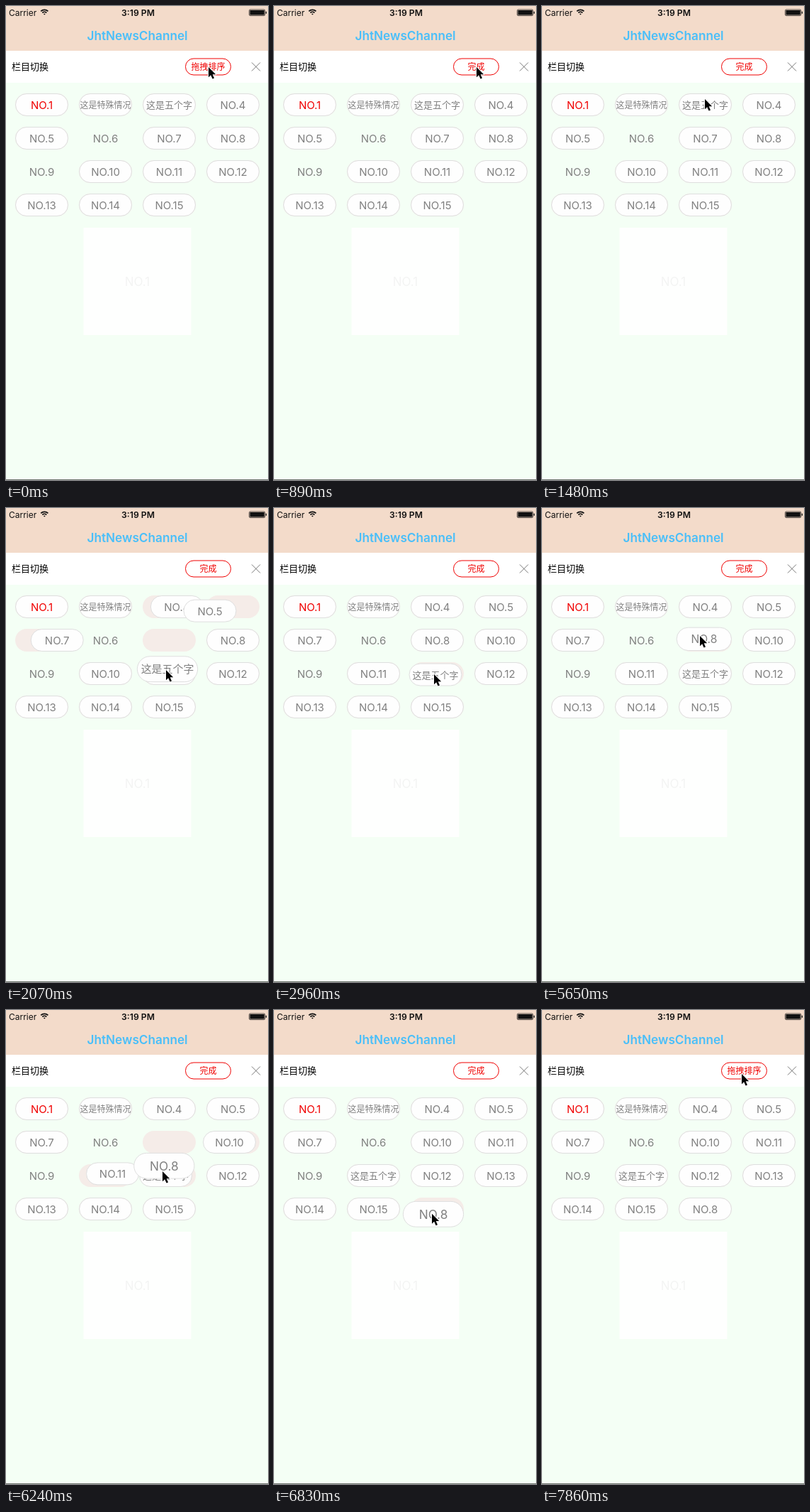
An HTML page with a canvas that plays this animation: 370 px wide and 667 px high, repeating every 8 s.

```html
<!DOCTYPE html>
<html lang="zh-CN">
<head>
<meta charset="utf-8">
<title>Channel sorting</title>
<style>
  html, body { margin: 0; width: 100%; height: 100%; overflow: hidden; background: #f4fff5; }
  canvas { display: block; }
</style>
</head>
<body>
<canvas id="stage" width="370" height="667"></canvas>
<script>
const ctx = document.getElementById('stage').getContext('2d');
const LOOP = 8000, STEP = 147, MOVE_TIME = 300, GROWTH = 0.15;
const FONT = 'Inter, "Noto Sans CJK SC", "Noto Sans CJK", sans-serif';
const FIXED = [5, 8];

const labels = Array.from({ length: 15 }, (_, i) => 'NO.' + (i + 1));
labels[1] = '这是特殊情况';
labels[2] = '这是五个字';

// Each reorder takes the channel in one slot to another slot.
const reorders = [
  { start: 1835, from: 2, to: 6 },
  { start: 2072, from: 6, to: 10 },
  { start: 6195, from: 6, to: 10 },
  { start: 6450, from: 10, to: 14 }
];
const drags = [
  { channel: 2, press: 1580, release: 2900, end: 3050 },
  { channel: 7, press: 5600, release: 6900, end: 7050 }
];
const cursorPath = [
  [0, 286, 86], [747, 286, 86], [1041, 255, 110], [1188, 238, 124],
  [1335, 230, 131], [1629, 229, 131], [1776, 228, 155], [1923, 226, 222],
  [2070, 226, 228], [2217, 226, 234], [3099, 226, 234], [3246, 225, 222],
  [3393, 223, 190], [3540, 223, 180], [5650, 223, 180], [5944, 223, 186],
  [6091, 222, 200], [6238, 221, 227], [6385, 221, 254], [6532, 222, 278],
  [6679, 223, 287], [7120, 223, 286], [7267, 238, 225], [7414, 262, 140],
  [7561, 280, 95], [7708, 282, 90], [8000, 282, 90]
];

const clamp = v => Math.max(0, Math.min(1, v));
const smooth = v => v * v * (3 - 2 * v);
const mix = (a, b, k) => a.map((v, i) => v + (b[i] - v) * k);
const slotCenter = slot => [50.5 + 90 * (slot % 4), 139 + 47 * Math.floor(slot / 4)];

// Pinned channels keep their slots; the others close the gap around them.
function reorder(order, from, to) {
  const free = order.map((_, i) => i).filter(i => !FIXED.includes(i));
  const queue = free.map(i => order[i]);
  const [taken] = queue.splice(free.indexOf(from), 1);
  queue.splice(free.indexOf(to), 0, taken);
  const next = order.slice();
  free.forEach((slot, i) => { next[slot] = queue[i]; });
  return next;
}

let order = labels.map((_, i) => i);
for (const change of reorders) {
  order = reorder(order, change.from, change.to);
  change.order = order;
}

function heldTime(t) {
  if (t < 600) return 0;
  const base = t < 5650 ? 600 : 5650;
  return base + STEP * Math.floor((t - base) / STEP);
}

function cursorAt(t) {
  const i = Math.max(1, cursorPath.findIndex(p => p[0] > t));
  const [a, b] = [cursorPath[i - 1], cursorPath[i]];
  return mix(a.slice(1), b.slice(1), clamp((t - a[0]) / (b[0] - a[0])));
}

function channelCenter(channel, t) {
  return reorders.reduce((pos, r) =>
    mix(pos, slotCenter(r.order.indexOf(channel)), smooth(clamp((t - r.start) / MOVE_TIME))),
  slotCenter(channel));
}

function text(str, x, y, size, color, weight = 400, align = 'center') {
  ctx.font = `${weight} ${size}px ${FONT}`;
  ctx.textAlign = align;
  ctx.fillStyle = color;
  ctx.fillText(str, x, y + size * 0.37);
}

function rect(x, y, w, h, color) {
  ctx.fillStyle = color;
  ctx.fillRect(x, y, w, h);
}

function pill(x, y, w, h, fill, stroke) {
  const inset = stroke ? 0.5 : 0;
  ctx.beginPath();
  ctx.roundRect(x - w / 2 + inset, y - h / 2 + inset, w - 2 * inset, h - 2 * inset, h / 2 - inset);
  ctx.fillStyle = fill;
  ctx.fill();
  if (stroke) {
    ctx.lineWidth = 1;
    ctx.strokeStyle = stroke;
    ctx.stroke();
  }
}

function drawChannel(channel, [x, y], scale = 1) {
  const size = { 1: 12, 2: 13 }[channel] || 15;
  if (!FIXED.includes(channel)) pill(x, y, 75 * scale, 32 * scale, '#fefefe', '#dedede');
  text(labels[channel], x, y + 0.3, size * scale, channel ? '#808080' : '#f00000');
}

function drawStatusBar() {
  text('Carrier', 4, 9.3, 12, '#111', 400, 'left');
  text('3:19 PM', 186.5, 9.3, 12.2, '#111', 600);
  ctx.strokeStyle = '#111';
  ctx.lineWidth = 1.7;
  for (const radius of [1, 4.2, 7.2]) {
    ctx.beginPath();
    ctx.arc(54.3, 12.5, radius, -Math.PI * 0.75, -Math.PI * 0.25);
    ctx.stroke();
  }
  ctx.lineWidth = 0.7;
  ctx.beginPath();
  ctx.roundRect(343.4, 5, 22.4, 8.6, 1.6);
  ctx.stroke();
  rect(344.4, 6, 20.4, 6.6, '#111');
  rect(366.7, 7.8, 1.3, 3, '#111');
}

function drawHeader(sorting) {
  rect(0, 0, 370, 63, '#f3dbca');
  rect(0, 63, 370, 45, '#fff');
  drawStatusBar();
  text('JhtNewsChannel', 185.5, 41.5, 17.2, '#4abff9', 600);
  text('栏目切换', 8, 85.5, 13, '#000', 400, 'left');
  pill(285.5, 85.5, 65, 24, '#fff', '#f00000');
  text(sorting ? '完成' : '拖拽排序', 285.5, 86, 12, '#f00000');
  ctx.strokeStyle = '#777';
  ctx.lineWidth = 1;
  ctx.beginPath();
  ctx.moveTo(347, 79.5);
  ctx.lineTo(359, 91.5);
  ctx.moveTo(359, 79.5);
  ctx.lineTo(347, 91.5);
  ctx.stroke();
}

function drawCursor([x, y]) {
  const arrow = new Path2D('M0 0V14.2L3.2 11.2L5.6 16.6L8 15.6L5.7 10.3H10.2Z');
  ctx.save();
  ctx.translate(x, y);
  ctx.lineJoin = 'round';
  ctx.lineWidth = 2;
  ctx.strokeStyle = '#fff';
  ctx.stroke(arrow);
  ctx.fillStyle = '#000';
  ctx.fill(arrow);
  ctx.restore();
}

function draw(t) {
  rect(0, 0, 370, 667, '#f4fff5');
  rect(0, 666, 370, 1, '#737873');
  rect(109.5, 312, 152, 151, '#fefffe');
  text('NO.1', 185.5, 387.5, 17, '#f3f4f3');
  drawHeader(t >= 600 && t < 7700);

  labels.forEach((_, slot) => {
    if (!FIXED.includes(slot)) pill(...slotCenter(slot), 75, 32, '#f5ece8');
  });

  const drag = drags.find(d => t >= d.press && t < d.end);
  labels.forEach((_, channel) => {
    if (!drag || channel !== drag.channel) drawChannel(channel, channelCenter(channel, t));
  });
  if (drag) {
    const grip = clamp((t - drag.press) / 167);
    const [x, y] = cursorAt(t - 45);
    const scale = t < drag.release ? 1 + GROWTH * grip : 1;
    drawChannel(drag.channel, mix(channelCenter(drag.channel, t), [x + 2, y + 0.5], grip), scale);
  }
  drawCursor(cursorAt(t));
}

const began = performance.now();
function tick() {
  draw(heldTime((performance.now() - began) % LOOP));
  requestAnimationFrame(tick);
}
tick();
</script>
</body>
</html>
```
